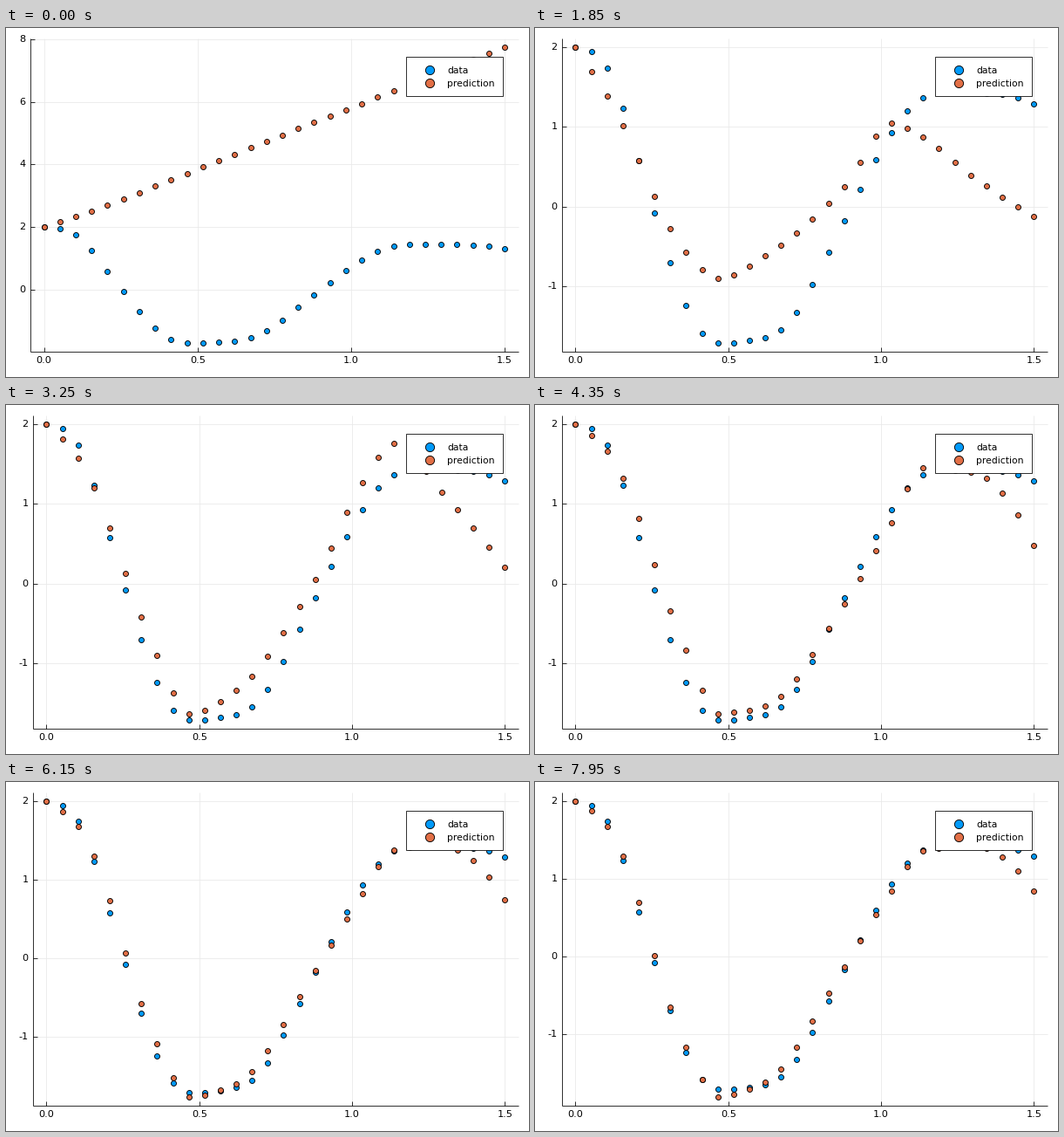
Write a matplotlib script that moves like this. It is 600x400 px and loops after 8000 ms.

```python
import numpy as np
import matplotlib.pyplot as plt
from matplotlib.animation import FuncAnimation
from matplotlib.patches import Rectangle

W, H, DPI = 600, 400, 100
PX = 72 / DPI                      # points per pixel
STEP, FRAMES = 50, 160
N = 30
TOP, BOTTOM, RIGHT = 12, 371, 588
BLUE, ORANGE, GRID = "#009afa", "#e26f46", "#e9e9e9"

idx = np.arange(N)
ts = np.linspace(0, 1.5, N)


def spiral():
    """Cubic spiral ODE solved with RK4; returns its first component."""
    def rate(u):
        x, y = u ** 3
        return np.array([-0.1 * x - 2 * y, 2 * x - 0.1 * y])

    sub = 40
    h = ts[1] / sub
    u = np.array([2.0, 0.0])
    out = [u[0]]
    for _ in range(N - 1):
        for _ in range(sub):
            a = rate(u)
            b = rate(u + h / 2 * a)
            c = rate(u + h / 2 * b)
            d = rate(u + h * c)
            u = u + h / 6 * (a + 2 * b + 2 * c + d)
        out.append(u[0])
    return np.array(out)


def smooth(xk, yk, x):
    """Monotone cubic through key points, with parabolic end pieces."""
    xk, yk = np.array(xk, float), np.array(yk, float)
    h = np.diff(xk)
    s = np.diff(yk) / h
    m = np.zeros_like(yk)
    for i in range(1, len(h)):
        if s[i - 1] * s[i] > 0:
            w1, w2 = 2 * h[i] + h[i - 1], h[i] + 2 * h[i - 1]
            m[i] = (w1 + w2) / (w1 / s[i - 1] + w2 / s[i])
    m[0], m[-1] = 2 * s[0] - m[1], 2 * s[-1] - m[-2]
    k = np.clip(np.searchsorted(xk, x, side="right") - 1, 0, len(h) - 1)
    u, hk = (x - xk[k]) / h[k], h[k]
    return ((1 + 2 * u) * (1 - u) ** 2 * yk[k] + u * (1 - u) ** 2 * hk * m[k]
            + u * u * (3 - 2 * u) * yk[k + 1] + u * u * (u - 1) * hk * m[k + 1])


def wave(*vals):
    return smooth([0, 2, 7, 9, 12, 17, 20, 22, 25, 29], (2,) + vals, idx)


# Prediction curves at the turning points of the training
start = 2 + 0.1981 * idx - 0.05 * idx * np.exp(-idx / 5)
decay = 0.43 + 1.57 * np.exp(-idx / 2.95) + 0.14 * (idx / 29) ** 3
swing = wave(1.47, -1.15, -1.62, -1.17, 0.14, 1.34, 1.06, 0.33, -0.47)
rise = wave(1.57, -0.90, -1.64, -1.34, 0.05, 1.27, 1.76, 1.15, 0.20)
crest = rise + 0.18 * np.exp(-((idx - 22.5) / 1.3) ** 2)
settle = wave(1.66, -0.84, -1.63, -1.54, -0.25, 0.76, 1.45, 1.40, 0.475)
final = wave(1.68, -1.17, -1.81, -1.62, -0.13, 0.845, 1.36, 1.43, 0.84)

# (time in ms, curve, ease-out power on the way there)
stages = [(0, start, 1), (1050, decay, 2.2), (2600, swing, 1.5), (3250, rise, 1),
          (3400, crest, 1), (4350, settle, 1.5), (7950, final, 2)]


def predict(t):
    for (t0, a, _), (t1, b, power) in zip(stages, stages[1:]):
        if t <= t1:
            return b + (a - b) * (1 - (t - t0) / (t1 - t0)) ** power
    return final


data = spiral()

fig = plt.figure(figsize=(W / DPI, H / DPI), dpi=DPI, facecolor="white")
ax = fig.add_axes([0, 0, 1, 1])
ax.set_xlim(0, W)
ax.set_ylim(H, 0)
ax.axis("off")


def font(px):
    return dict(family="DejaVu Sans", size=px * PX, color="black")


def line(color="black", z=2):
    return ax.plot([], [], color=color, lw=0.8 * PX, zorder=z,
                   solid_capstyle="butt")[0]


def dots(color, size, z, x=(), y=()):
    return ax.plot(x, y, "o", ms=size * PX, mfc=color, mec="black",
                   mew=0.9 * PX, zorder=z, snap=False)[0]


def tick(ha):
    return line(GRID, 1), line(), ax.text(0, 0, "", ha=ha, va="center", **font(11.3))


x_ticks = [tick("center") for _ in range(4)]
y_ticks = [tick("right") for _ in range(8)]
x_axis, y_axis = line(), line()
data_dots = dots(BLUE, 6, 3)
pred_dots = dots(ORANGE, 6, 4)

ax.add_patch(Rectangle((458.5, 32.5), 111.5, 45, fc="white", ec="black",
                       lw=0.8 * PX, zorder=5))
for name, color, y in (("data", BLUE, 47.5), ("prediction", ORANGE, 62.8)):
    dots(color, 10.2, 6, [486], [y])
    ax.text(506, y + 4, name, va="baseline", zorder=6, **font(10.7))


def draw(n):
    pred = predict(n * STEP)
    lo = min(data.min(), pred.min())
    hi = max(data.max(), pred.max())
    pad = 0.03 * (hi - lo)
    lo, hi = lo - pad, hi + pad
    step = 2 if hi - lo > 7 else 1
    marks = range(int(np.ceil(lo / step)) * step, int(np.floor(hi)) + 1, step)
    left = 30.7 if marks[0] < 0 else 27.7

    def px(t):
        return left + (RIGHT - left) * (t + 0.045) / 1.59

    def py(v):
        return TOP + (BOTTOM - TOP) * (hi - v) / (hi - lo)

    x_axis.set_data([left, RIGHT], [BOTTOM, BOTTOM])
    y_axis.set_data([left, left], [TOP, BOTTOM])
    for k, (grid, mark, label) in enumerate(x_ticks):
        x = px(k / 2)
        grid.set_data([x, x], [TOP, BOTTOM])
        mark.set_data([x, x], [BOTTOM - 5.5, BOTTOM])
        label.set_position((x, 380.7))
        label.set_text(f"{k / 2:.1f}")
    for k, parts in enumerate(y_ticks):
        shown = k < len(marks)
        for p in parts:
            p.set_visible(shown)
        if shown:
            grid, mark, label = parts
            y = py(marks[k])
            grid.set_data([left, RIGHT], [y, y])
            mark.set_data([left, left + 5.5], [y, y])
            label.set_position((left - 5, y))
            label.set_text(str(marks[k]))
    data_dots.set_data(px(ts), py(data))
    pred_dots.set_data(px(ts), py(pred))
    return []


anim = FuncAnimation(fig, draw, frames=FRAMES, interval=STEP,
                     init_func=lambda: draw(0), repeat=True, repeat_delay=0)
plt.show()
```
